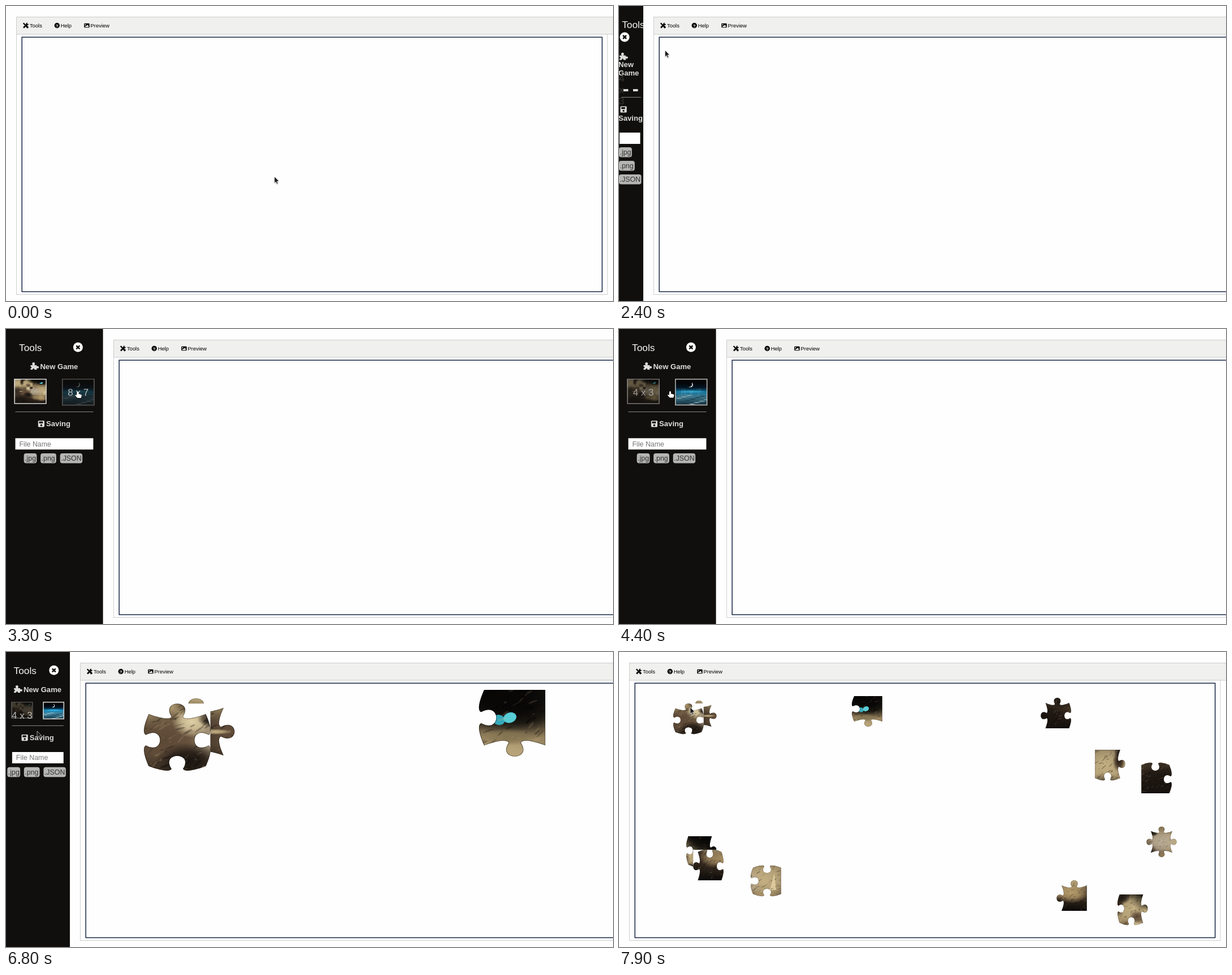
These frames come from a looping animation (1074 px wide and 522 px high, 8 s). An HTML page with a canvas:

```html
<!DOCTYPE html>
<html lang="en">
<head>
<meta charset="utf-8">
<title>Jigsaw editor</title>
<style>
html, body { margin: 0; width: 100%; height: 100%; overflow: hidden; background: #fefefe; }
canvas { display: block; }
</style>
</head>
<body>
<canvas id="stage" width="1074" height="522"></canvas>
<script>
let ctx = document.getElementById('stage').getContext('2d');
const LOOP = 8000, STEP = 100, SIDEBAR = 171.8;
const PAPER = '#fefefe', INK = '#100f0d', PALE = '#dcdcda', BAR = '#f0f0ef';
const FONT = '"Liberation Sans", Arial, sans-serif';

const clamp = x => Math.min(1, Math.max(0, x));
const ramp = (t, from, to) => clamp((t - from) / (to - from));
const pulse = (t, a, b, c, d) => ramp(t, a, b) - ramp(t, c, d);

// CSS "ease": cubic-bezier(.25, .1, .25, 1)
function ease(x) {
  let lo = 0, hi = 1, s;
  for (let i = 0; i < 20; i++) {
    s = (lo + hi) / 2;
    if (.75 * s * (1 - s) + s ** 3 < x) lo = s; else hi = s;
  }
  return .3 * s * (1 - s) ** 2 + 3 * s * s * (1 - s) + s ** 3;
}

// Pointer stops: [time, x, y]
const stops = [
  [1100, 475, 302], [1400, 370, 177], [1700, 200, 83], [2000, 101, 51], [2200, 54, 36],
  [2600, 109, 121], [3400, 130, 110], [3800, 60, 122], [4200, 55, 118], [4400, 91, 111],
  [4700, 122, 116], [5000, 80, 168], [5500, 110, 68], [5900, 63, 135], [6200, 48, 118],
  [6600, 48, 118], [7000, 62, 162], [7400, 62, 162], [7900, 126, 98]
];
function pointer(t) {
  const next = stops.findIndex(s => s[0] >= t);
  if (next < 1) return stops[0].slice(1);
  const [t1, x1, y1] = stops[next - 1], [t2, x2, y2] = stops[next];
  const k = ramp(t, t1, t2);
  return [x1 + (x2 - x1) * k, y1 + (y2 - y1) * k];
}

function text(str, x, y, size, color, weight = '', align = 'left') {
  ctx.font = `${weight} ${size}px ${FONT}`;
  ctx.fillStyle = color;
  ctx.textAlign = align;
  ctx.fillText(str, x, y);
}
function box(x, y, w, h, color, r = 0) {
  ctx.fillStyle = color;
  ctx.beginPath();
  ctx.roundRect(x, y, w, h, r);
  ctx.fill();
}
function frame(x, y, w, h, color, width = 1) {
  ctx.strokeStyle = color;
  ctx.lineWidth = width;
  ctx.strokeRect(x, y, w, h);
}
function blob(x, y, rx, ry, color, angle = 0) {
  ctx.fillStyle = color;
  ctx.beginPath();
  ctx.ellipse(x, y, rx, ry, angle, 0, 7);
  ctx.fill();
}
function poly(points, color) {
  ctx.fillStyle = color;
  ctx.beginPath();
  for (let i = 0; i < points.length; i += 2) ctx.lineTo(points[i], points[i + 1]);
  ctx.closePath();
  ctx.fill();
}
function line(x1, y1, x2, y2, color, width) {
  ctx.strokeStyle = color;
  ctx.lineWidth = width;
  ctx.beginPath();
  ctx.moveTo(x1, y1);
  ctx.lineTo(x2, y2);
  ctx.stroke();
}
function at(x, y, draw) {
  ctx.save();
  ctx.translate(x, y);
  draw();
  ctx.restore();
}
function shade(height, colors) {
  const g = ctx.createLinearGradient(0, 0, 0, height);
  colors.forEach((c, i) => g.addColorStop(i / (colors.length - 1), c));
  return g;
}
// Soft elliptical spot of a six-digit colour.
function glow(x, y, rx, ry, color) {
  at(x, y, () => {
    ctx.scale(rx, ry);
    const g = ctx.createRadialGradient(0, 0, 0, 0, 0, 1);
    g.addColorStop(0, color);
    g.addColorStop(.5, color + 'c0');
    g.addColorStop(1, color + '00');
    blob(0, 0, 1, 1, g);
  });
}

// Paints a picture once, 4 x 3 units in size.
function picture(paint) {
  const canvas = document.createElement('canvas'), stage = ctx;
  canvas.width = 480;
  canvas.height = 360;
  ctx = canvas.getContext('2d');
  ctx.scale(120, 120);
  paint();
  ctx = stage;
  return canvas;
}

const cliffs = picture(() => {
  const TAN = '#c4b083', BROWN = '#5c4836', DARK = '#1a1410', TEAL = '#57cdd6';
  box(0, 0, 4, 3, shade(3, ['#2c251c', '#8f7c59', '#806c50', '#4b3b2b', '#0b0908']));
  glow(.4, .5, 1.1, .9, TAN);
  glow(1.6, .5, .8, .6, TAN);
  glow(3.4, 1.5, 1, .9, TAN);
  glow(2.5, 1.5, .8, .6, '#b9ac95');
  glow(2.9, 0, 1.5, .85, '#030303');
  glow(3.6, .3, .9, .6, '#080706');
  glow(2.1, .7, .3, .3, TAN);
  glow(.4, 1.5, .8, .7, '#352a21');
  glow(1.3, 1.5, .7, .6, BROWN);
  glow(1.75, 1.15, .35, .3, '#e0d0a6');
  glow(1.7, 1.9, .6, .35, DARK);
  glow(.8, 2.6, 1.7, .85, DARK);
  glow(2.7, 2.2, .6, .35, '#9a835d');
  glow(3.4, 2.3, .7, .4, '#b59b6a');
  glow(.95, .4, .25, .4, '#2a1c13');
  glow(1.1, .1, .35, .25, DARK);
  glow(1.75, .8, .35, .25, BROWN);
  glow(2.1, 1.1, .25, .15, DARK);
  blob(3.24, .54, .1, .09, '#35aaba', .5);
  blob(3.42, .5, .11, .09, TEAL, -.5);
  glow(3.4, .85, .5, .15, '#857451');
  glow(.85, 1.5, .3, .06, TAN);
  poly([3.6, 1.85, 3.76, 1.2, 3.82, 1.85], '#dcc99b');

  let seed = 13;
  const random = () => (seed = seed * 16807 % 2147483647) / 2147483647;
  for (let i = 0; i < 700; i++) {
    blob(random() * 4, random() * 3, .01 + random() * .09, .005 + random() * .015,
      random() < .6 ? 'rgba(0,0,0,.28)' : 'rgba(215,185,140,.16)', -1 + random() * .8);
  }
});

const planet = picture(() => {
  box(0, 0, 4, 3, shade(3, ['#010204', '#010408', '#03182a', '#1483b4', '#4789a3', '#2c5f74', '#132c3a']));
  glow(2, 1.45, 2, .18, '#35b8e6');
  for (let i = 0; i < 14; i++) glow(i * 1.7 % 4, 1.8 + i * .08, .5, .09, i % 2 ? '#9fc3cf' : '#1d4a5e');
  blob(1.92, .68, .3, .29, '#d4e6ed');
  blob(1.82, .62, .28, .27, '#02060b');
});

const icons = {
  tools() {
    line(-4.3, -4.3, 4, 4, '#000', 2.2);
    line(1.5, 1.5, 4, 4, '#000', 3.2);
    line(-4, 4, 2, -2, '#000', 2.6);
    blob(2.6, -2.6, 2.3, 2.3, '#000');
    poly([2.6, -2.6, 3, -6, 6, -3], BAR);
  },
  help() {
    blob(0, 0, 4.7, 4.7, '#000');
    text('?', 0, 3, 8, '#fff', 'bold', 'center');
  },
  image() {
    box(-4.7, -3.8, 9.4, 7.6, '#000', 1);
    blob(-2.5, -1.6, 1, 1, BAR);
    poly([-3.5, 2.7, -1.8, .2, -.8, 1.1, 1.6, -1.4, 3.6, 2.7], BAR);
  },
  puzzle() {
    box(-7, -1.5, 11, 8, PALE);
    blob(-1.7, -4, 2.4, 2.6, PALE);
    box(-2.8, -3, 2.2, 3, PALE);
    blob(5.5, 2.2, 2.3, 2, PALE);
    blob(-6.8, 2.5, 1.6, 1.6, INK);
    blob(-1.6, 6, 1.5, 1.8, INK);
  },
  floppy() {
    box(-5.6, -5.6, 11.2, 11.2, PALE, 1.3);
    box(-3.8, -4, 6.6, 3.2, INK);
    blob(0, 2.4, 1.7, 1.7, INK);
  },
  close() {
    blob(0, 0, 8.5, 8.5, '#fff');
    line(-3, -3, 3, 3, INK, 2.5);
    line(-3, 3, 3, -3, INK, 2.5);
  }
};

// Seams of the 4 x 3 puzzle: "+" is a tab to the right or down, "-" to the left or up.
const rightSeams = ['+++', '+-+', '---'];
const downSeams = ['---+', '+-+-'];
const sign = char => char ? (char === '+' ? 1 : -1) : 0;

// Scattered piece centers, row by row.
const scatter = [
  [869, 200], [909, 456], [146, 353], [439, 105],
  [146, 113], [123, 118], [960, 336], [260, 405],
  [951, 223], [773, 108], [158, 377], [801, 431]
];

// Top, right, bottom and left edge of a cell: 1 tab, -1 notch, 0 straight.
function edges(col, row) {
  return [
    -sign(downSeams[row - 1]?.[col]), sign(rightSeams[row][col]),
    sign(downSeams[row]?.[col]), -sign(rightSeams[row][col - 1])
  ];
}
function outline(sides) {
  ctx.beginPath();
  ctx.moveTo(-.5, -.5);
  for (const d of sides) {
    if (d) {
      const y = k => -.5 + k * d;
      ctx.bezierCurveTo(-.5, -.5, -.15, y(.15), -.1, y(.05));
      ctx.bezierCurveTo(-.3, y(-.28), .3, y(-.28), .1, y(.05));
      ctx.bezierCurveTo(.15, y(.15), .5, -.5, .5, -.5);
    } else ctx.lineTo(.5, -.5);
    ctx.rotate(Math.PI / 2);
  }
}
// Every piece, tabs included, fills the same box with an opaque backing.
function drawPiece(col, row, size) {
  const sides = edges(col, row);
  const [top, right, bottom, left] = sides.map(d => .5 + (d > 0 ? .2 : d < 0 ? .08 : 0));
  ctx.scale(53.5 * size / (left + right), 54 * size / (top + bottom));
  ctx.translate((left - right) / 2, (top - bottom) / 2);
  box(-left, -top, left + right, top + bottom, PAPER);
  outline(sides);
  ctx.clip();
  ctx.drawImage(cliffs, -.5 - col, -.5 - row, 4, 3);
  ctx.strokeStyle = 'rgba(0,0,0,.4)';
  ctx.lineWidth = .02;
  ctx.stroke();
}
function drawPieces(t) {
  const zoom = ramp(t, 7400, 7900);
  const spread = .533 ** (zoom - 1), size = .457 ** (zoom - 1);
  ctx.save();
  ctx.beginPath();
  ctx.rect(28, 55, 1027, 450);
  ctx.clip();
  scatter.forEach(([x, y], i) =>
    at(46.5 + (x - 46.5) * spread, 81 + (y - 81) * spread, () => drawPiece(i % 4, i >> 2, size)));
  ctx.restore();
}

function drawPage(t) {
  frame(18.5, 19.5, 1045.5, 491, '#cfcfcf');
  box(18, 19, 1100, 31, BAR);
  frame(18.5, 19.5, 1100, 30.5, '#cbcbcb');
  at(35, 34.5, icons.tools);
  at(90.3, 34.5, icons.help);
  at(143, 34.5, icons.image);
  text('Tools', 42, 38, 9.4, '#000');
  text('Help', 96.8, 38, 9.4, '#000');
  text('Preview', 149.6, 38, 9.4, '#000');
  if (t >= 6800) drawPieces(t);
  frame(28.2, 55.2, 1026.5, 450.3, '#0a1a3c', 1.42);
}

function thumb(x, w, h, image, label, dim) {
  ctx.drawImage(image, x, 88, w, h);
  frame(x + .75, 88.75, w - 1.5, h - 1.5, '#d8d8d6', 1.5);
  box(x, 88, w, h, `rgba(16,15,13,${.7 * dim})`);
  ctx.globalAlpha = dim * .85;
  text(label, x + w / 2, 117.5, 17, '#d6d6d4', '', 'center');
  ctx.globalAlpha = 1;
}
function tag(label, x, y, width) {
  box(x, y, width, 17.5, '#b5b5b3', 4);
  text(label, x + 1.5, y + 13, 12.4, '#333');
}
function drawNarrow(w) {
  at(10, 55, icons.close);
  at(8, 89, icons.puzzle);
  text('New', -1, 107.5, 13.1, PALE, 'bold');
  text('Game', -1, 122.5, 13.1, PALE, 'bold');
  [...'4x3'].forEach((c, i) => text(c, 0, 134 + i * 20, 17, '#393836'));
  for (const x of [.18, .58]) box(x * w, 147, w / 5, 4, PALE);
  line(.1 * w, 161.5, .9 * w, 161.5, '#8a8a88', 1);
  at(8, 183, icons.floppy);
  text('Saving', -1, 202.5, 13.1, PALE, 'bold');
  box(1, 224, w * .85, 20, '#fff');
  tag('.jpg', 0, 250, 22.8);
  tag('.png', 0, 274, 27.8);
  tag('.JSON', 0, 298, 39.5);
}
function drawWide(w, t) {
  const mid = w / 2, rule = 99 + w * .277;
  const smallDim = pulse(t, 3600, 3900, 4300, 4700) + ramp(t, 5900, 6300);
  const largeDim = pulse(t, 2550, 2900, 3500, 3900) + pulse(t, 4350, 4600, 4800, 5100);
  at(.727 * w + 2.5, 32.3, icons.close);
  at(mid - 35.5, 65.5, icons.puzzle);
  text('New Game', mid - 25.5, 70.5, 13.1, PALE, 'bold');
  thumb(.084 * w, w / 3, w * .26, cliffs, '4 x 3', smallDim);
  thumb(.577 * w, w / 3, w * .275, planet, '8 x 7', largeDim);
  line(.096 * w, rule, .9 * w, rule, '#8a8a88', 1);
  at(mid - 23.5, rule + 21.2, icons.floppy);
  text('Saving', mid - 14.8, rule + 25.7, 13.1, PALE, 'bold');
  box(.096 * w, rule + 46.7, .803 * w, 20, '#fff');
  text('File Name', .096 * w + 7, rule + 61, 12.4, '#767676');
  tag('.jpg', mid - 54.3, rule + 73.3, 22.8);
  tag('.png', mid - 24.8, rule + 73.3, 27.8);
  tag('.JSON', mid + 9.8, rule + 73.3, 39.5);
}
function drawSidebar(w, t) {
  ctx.save();
  ctx.beginPath();
  ctx.rect(0, 0, w, 522);
  ctx.clip();
  box(0, 0, w, 522, INK);
  text('Tools', Math.max(.12 * w, .23 * w - 16.5), 38.5, 17.3, '#f4f4f2');
  if (w < 75) drawNarrow(w); else drawWide(w, t);
  ctx.restore();
}

function drawCursor(t) {
  at(...pointer(t), () => {
    ctx.lineJoin = 'round';
    ctx.shadowColor = 'rgba(0,0,0,.4)';
    ctx.shadowBlur = 2;
    ctx.shadowOffsetY = 1;
    if (t >= 2500 && t < 6700) {
      poly([-2, 0, -.5, -1, 1, 0, 1, 3.5, 6, 4.8, 6.5, 6, 5.3, 10.5, -1, 10.5, -5, 6.2, -4.5, 5, -2, 6], '#fff');
    } else {
      poly([0, 0, 0, 11.2, 2.6, 8.9, 4.5, 13, 6.3, 12.2, 4.4, 8.2, 7.8, 7.8], '#181818');
      ctx.shadowColor = 'transparent';
      ctx.strokeStyle = '#fff';
      ctx.lineWidth = .6;
      ctx.stroke();
    }
  });
}

function draw(now) {
  const t = Math.floor(now % LOOP / STEP) * STEP;
  const width = SIDEBAR * (ease(ramp(t, 2310, 2810)) - ease(ramp(t, 6690, 7190)));
  box(0, 0, 1074, 522, PAPER);
  at(Math.round(width), 0, () => drawPage(t));
  if (width > .1) drawSidebar(width, t);
  drawCursor(t);
  requestAnimationFrame(draw);
}
requestAnimationFrame(draw);
</script>
</body>
</html>
```
